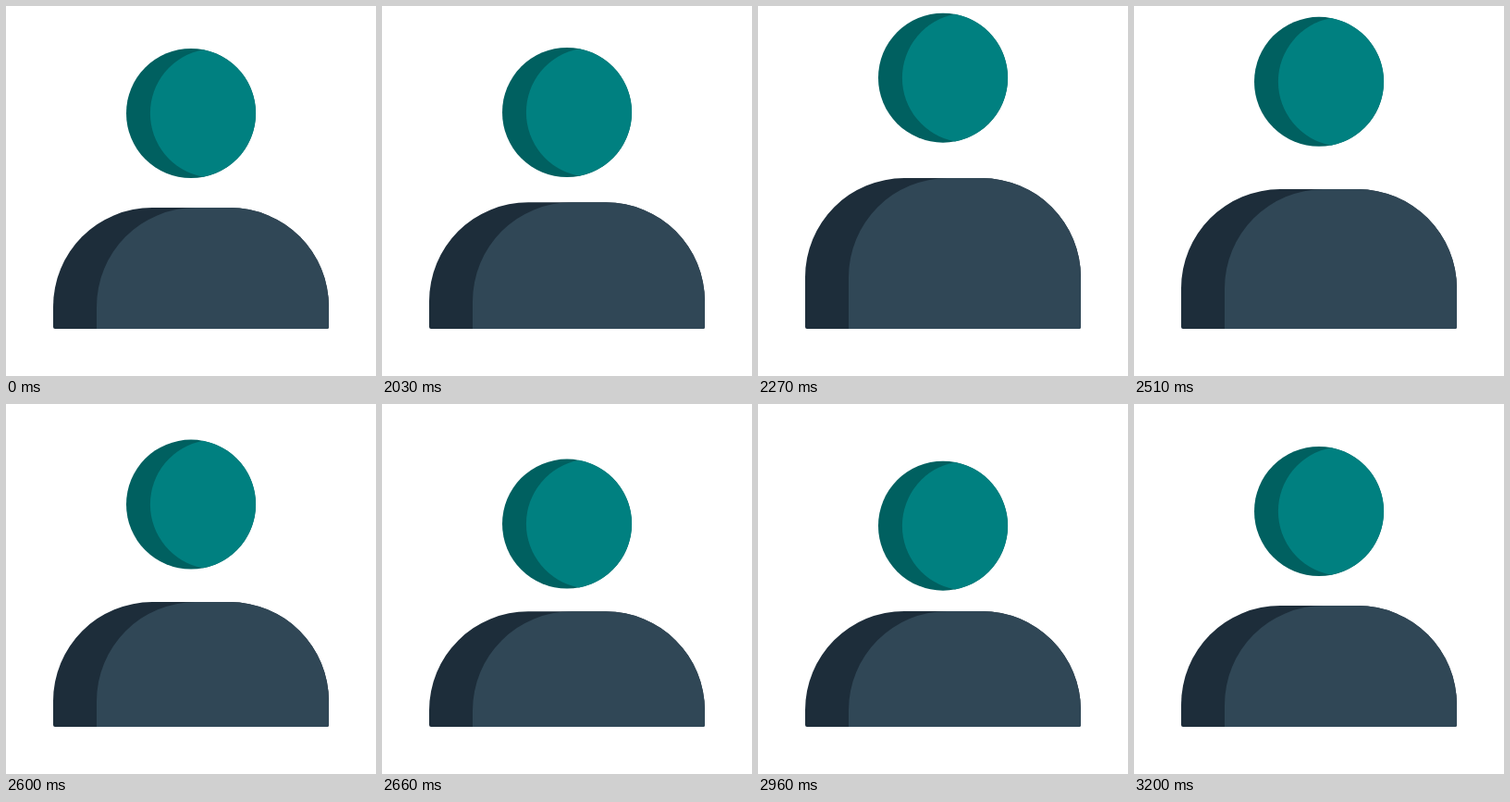
Write an HTML page that moves like this. It is 400x400 px and loops after 3230 ms.

```html
<!DOCTYPE html>
<html lang="en">
<head>
<meta charset="utf-8">
<title>User icon jump</title>
<style>
html, body { margin: 0; width: 100%; height: 100%; overflow: hidden; background: #fff; }
svg { display: block; width: 100%; height: 100%; }
</style>
</head>
<body>
<svg viewBox="0 0 400 400">
  <g id="head">
    <circle cx="200" cy="70" r="70" fill="#006060"/>
    <path d="M213 1.2A70 70 0 0 1 213 138.8A70 70 0 0 1 213 1.2Z" fill="#008080"/>
  </g>
  <path id="shade" fill="#1d2d3a"/>
  <path id="body" fill="#304756"/>
</svg>
<script>
const LOOP = 3230, START = 2000, STEP = 30;
const $ = id => document.getElementById(id);
const head = $('head'), shade = $('shade'), body = $('body');

const smooth = x => x * x * (3 - 2 * x);
const easeOut = x => 1 - (1 - x) * (1 - x);

// Each segment: [start step, end step, from, to, easing]
const headMove = [
  [0, 11, 46, 4, smooth],
  [14.75, 26.75, 4, 89, smooth],
  [26.75, 40, 89, 46, easeOut]
];
const bodyMove = [
  [0, 11, 218, 185, easeOut],
  [12.4, 26.2, 185, 235.5, smooth],
  [26.2, 40, 235.5, 218, easeOut]
];

function valueAt(move, k) {
  let v = move[0][2];
  for (const [a, b, from, to, ease] of move) {
    if (k < a) break;
    v = from + (to - from) * ease(Math.min(1, (k - a) / (b - a)));
  }
  return v;
}

// Dome with wide upper corners and slightly rounded feet
function dome(left, top, foot) {
  const r = 107, right = 349, base = 349;
  return `M${left} ${base - foot}V${top + r}A${r} ${r} 0 0 1 ${left + r} ${top}` +
    `H${right - r}A${r} ${r} 0 0 1 ${right} ${top + r}V${base - 2}` +
    `Q${right} ${base} ${right - 2} ${base}H${left + foot}Q${left} ${base} ${left} ${base - foot}Z`;
}

function draw(ms) {
  const k = Math.max(0, Math.floor((ms % LOOP - START) / STEP));
  const top = valueAt(bodyMove, k);
  head.setAttribute('transform', `translate(0 ${valueAt(headMove, k)})`);
  shade.setAttribute('d', dome(51, top, 2));
  body.setAttribute('d', dome(98, top, 0));
}

let origin = null;
function tick(now) {
  if (origin === null) origin = now;
  draw(Math.max(0, now - origin));
  requestAnimationFrame(tick);
}
draw(0);
requestAnimationFrame(tick);
</script>
</body>
</html>
```
